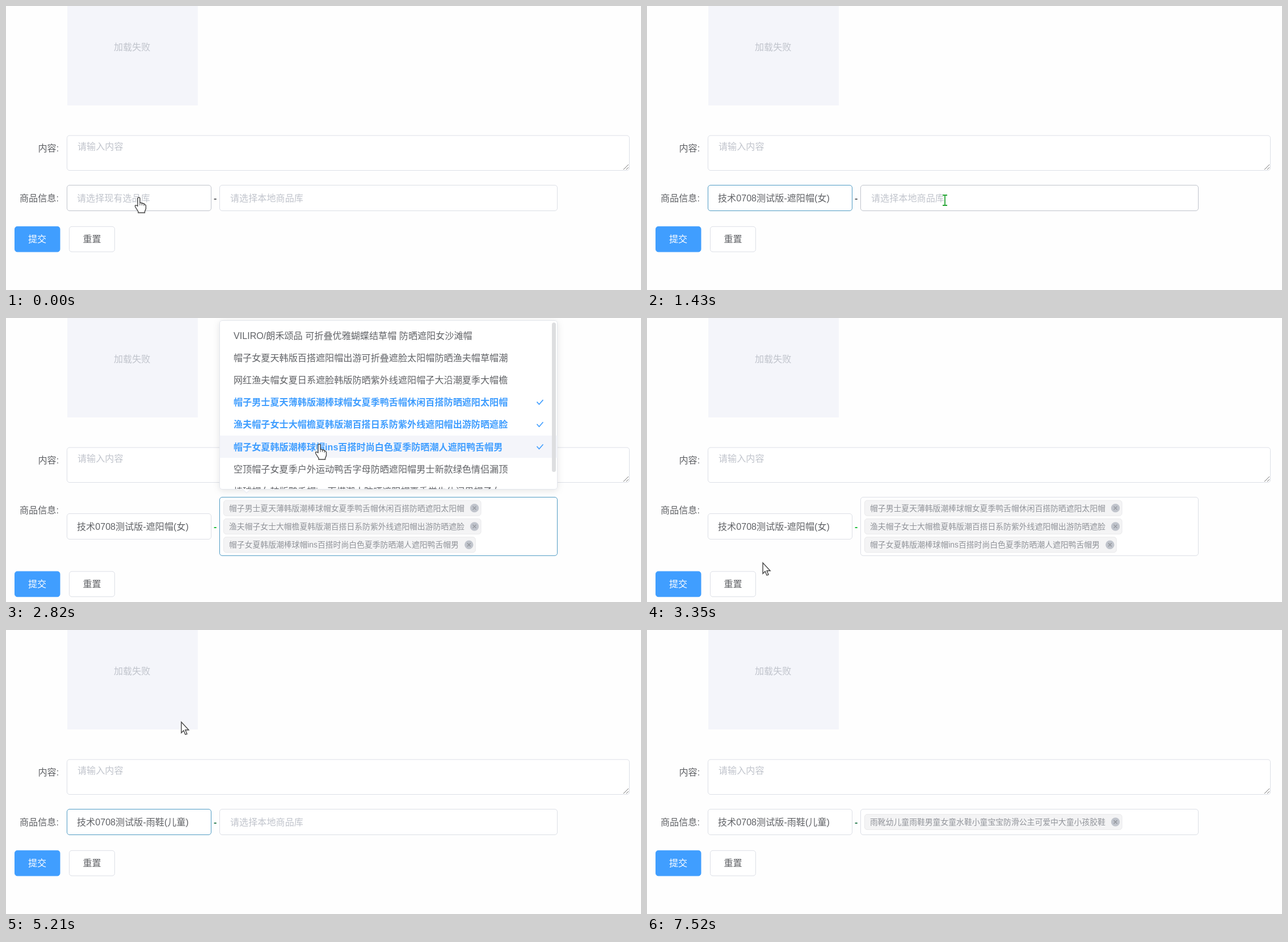
Recreate the animation shown at these times as an HTML page. Size 1119 by 500 pixels, loop 7.59 s.

```html
<!DOCTYPE html>
<html lang="zh-CN">
<head>
<meta charset="utf-8">
<style>
  html, body { margin: 0; width: 100%; height: 100%; overflow: hidden; background: #fefefe; }
  svg { display: block; }
  text { font: 16.13px "Liberation Sans", "Noto Sans CJK SC", "Noto Sans CJK", sans-serif; fill: #606266; }
  text.hint { fill: #c0c4cc; }
  text.tag { font-size: 13.83px; fill: #909399; }
  text.on { fill: #409eff; font-weight: 700; }
</style>
</head>
<body>
<svg id="stage" width="1119" height="500"></svg>
<script>
const LOOP = 7590, TICK = LOOP / 100, MOVE = 380;
const ROW = 39.2, TAG_ROW = 32.3, FIELD = 46, PAD = 7;
const LINE = '#dcdfe6', SOFT = '#f4f5fa', FOCUS = '#4f9bc4', BLUE = '#409eff';

// Pointer stops: each is reached at its time, after a move of at most MOVE ms
const stops = [
  { at: 0, x: 234, y: 337 }, { at: 600, x: 265, y: 200 },
  { at: 1400, x: 525, y: 342 }, { at: 2000, x: 557, y: 159 },
  { at: 2420, x: 554, y: 190 }, { at: 2600, x: 552, y: 222 },
  { at: 3200, x: 203, y: 433 }, { at: 3680, x: 240, y: 365 },
  { at: 4600, x: 309, y: 162 }, { at: 5650, x: 502, y: 342 },
  { at: 6200, x: 515, y: 384 }, { at: 7000, x: 700, y: 190 }
];

// When each dropdown opens and closes
const kindsA = [345, 740], hatsOpen = [1460, 3030], kindsB = [3690, 4800], bootsOpen = [5900, 7040];
const bootsPicked = 6430, pointerGone = 7360;
const hatPicked = i => 2130 + i * 265;

const kinds = ['凉鞋(男)', '雨鞋(儿童)', '雨伞(男)', '遮阳帽(女)', '泳衣(女)', '书包(儿童)']
  .map(k => '技术0708测试版-' + k);
const hats = [
  'VILIRO/朗禾颂品 可折叠优雅蝴蝶结草帽 防晒遮阳女沙滩帽',
  '帽子女夏天韩版百搭遮阳帽出游可折叠遮脸太阳帽防晒渔夫帽草帽潮',
  '网红渔夫帽女夏日系遮脸韩版防晒紫外线遮阳帽子大沿潮夏季大帽檐',
  '帽子男士夏天薄韩版潮棒球帽女夏季鸭舌帽休闲百搭防晒遮阳太阳帽',
  '渔夫帽子女士大帽檐夏韩版潮百搭日系防紫外线遮阳帽出游防晒遮脸',
  '帽子女夏韩版潮棒球帽ins百搭时尚白色夏季防晒潮人遮阳鸭舌帽男',
  '空顶帽子女夏季户外运动鸭舌字母防晒遮阳帽男士新款绿色情侣漏顶',
  '棒球帽女韩版鸭舌帽ins百搭潮人防晒遮阳帽夏季学生休闲男帽子女'
];
const boots = ['雨靴幼儿童雨鞋男童女童水鞋小童宝宝防滑公主可爱中大童小孩胶鞋'];

const clamp = u => Math.max(0, Math.min(1, u));
const ease = u => 1 - (1 - clamp(u)) ** 5;
const smooth = u => u * u * (3 - 2 * u);
const within = (t, [a, b]) => t >= a && t < b;
const shown = (t, [a, b]) => ease((t - a) / 200) * (1 - ease((t - b) / 200));

const text = (x, mid, s, cls = '', style = '') =>
  `<text x="${x}" y="${mid + 6}" class="${cls}" style="${style}">${s}</text>`;
const box = (x, y, w, h, stroke = LINE, fill = '#fff') =>
  `<rect x="${x + .5}" y="${y + .5}" width="${w - 1}" height="${h - 1}" rx="4.5" fill="${fill}" stroke="${stroke}"/>`;
const line = (d, stroke, width = 1) =>
  `<path d="${d}" fill="none" stroke="${stroke}" stroke-width="${width}"/>`;
const solid = d => `<path d="${d}" fill="#fff" stroke="#444" stroke-width="1.4"/>`;

const pointers = {
  arrow: solid('M0 0V19L4 15L7 22L10 21L7 14H13Z'),
  hand: solid('M-2 16V2a2 2 0 0 1 4 0V9l7 2l3.5 3v6l-2 5v2H-1V25l-5 -8q-2 -5 4 -2Z') +
    line('M2 9v5m3.5 -4v4m3.5 -3v4', '#444'),
  beam: line('M-4 -9H4M0 -9V9M-4 9H4', '#27a536', 1.8)
};

function pointerAt(t) {
  const i = stops.findLastIndex(s => s.at <= t);
  const from = stops[i], to = stops[i + 1];
  if (!to) return from;
  const time = Math.min(MOVE, to.at - from.at);
  const u = smooth(clamp(1 - (to.at - t) / time));
  return { x: from.x + (to.x - from.x) * u, y: from.y + (to.y - from.y) * u };
}

const over = (m, { x, y, w, h }) => m.x >= x && m.x <= x + w && m.y >= y && m.y <= y + h;

// A dropdown that unfolds from the edge facing its field
function drawMenu(menu, mouse) {
  const { x, y, w, h, up, items, picked, check, bar, p } = menu;
  const edge = up ? y + h : y, dir = up ? 1 : -1;
  const row = over(mouse, menu) ? Math.floor((mouse.y - y - PAD) / ROW) : -1;
  const list = items.map((s, i) => {
    const top = PAD + i * ROW, on = picked.includes(s);
    return (i === row ? `<rect y="${top}" width="${w}" height="${ROW}" fill="${SOFT}"/>` : '') +
      text(24.5, top + ROW / 2, s, on ? 'on' : '') +
      (on && check ? line(`M${w - 37} ${top + 19}l4 4.5l7 -8`, BLUE, 1.6) : '');
  }).join('');
  return `<g opacity="${p}" transform="translate(0 ${edge}) scale(1 ${p}) translate(0 ${-edge})">
    <g style="filter:drop-shadow(0 2px 6px rgba(0,0,0,.1))">${box(x, y, w, h, '#e4e7ed')}</g>
    <svg x="${x + .5}" y="${y}" width="${w - 1}" height="${h - 1}">${list}</svg>
    ${solid(`M${x + 41} ${edge - dir}l7 ${PAD * dir}l7 ${-PAD * dir}`).replace('#444', '#ebeef5')}
    ${bar ? `<rect x="${x + w - 10}" y="${y + 4}" width="7" height="263" rx="3.5" fill="#dddee0"/>` : ''}
  </g>`;
}

function drawTag(s, mid) {
  const w = [...s].reduce((n, c) => n + (c > '~' ? 13.85 : 6), 39), cx = 371 + w;
  return box(383, mid - 14, w, 28, '#e9e9eb', '#f4f4f5') + text(393, mid - .8, s, 'tag') +
    `<circle cx="${cx}" cy="${mid}" r="7.7" fill="#c0c4cc"/>` +
    line(`M${cx - 3} ${mid - 3}l6 6m0 -6l-6 6`, '#909399', 1.2);
}

function draw(t) {
  const second = t >= kindsB[1];
  const value = second ? kinds[1] : t >= kindsA[1] ? kinds[3] : '';
  const tags = second
    ? boots.filter(() => t >= bootsPicked)
    : hats.slice(3, 6).filter((s, i) => t >= hatPicked(i));
  const high = Math.max(FIELD, tags.length * TAG_ROW + PAD);
  const mid = 315 + high / 2, buttons = 341.8 + high;
  const mouse = pointerAt(t);

  const field1 = { x: 107, y: mid - FIELD / 2, w: 255, h: FIELD };
  const field2 = { x: 376, y: 315, w: 596, h: high };
  const area = { x: 107, y: 227.5, w: 992, h: 62.5 };

  const left = { ...field1, y: field1.y - 262, h: 249, up: true, items: kinds, picked: [value] };
  const right = { ...field2, picked: tags, check: true };
  const menus = [
    { ...left, span: kindsA },
    { ...left, span: kindsB },
    { ...right, span: hatsOpen, y: 4, h: 298, up: true, items: hats, bar: true },
    { ...right, span: bootsOpen, y: 375, h: 54, items: boots }
  ].map(m => ({ ...m, p: shown(t, m.span) })).filter(m => m.p > .01);

  const inMenu = menus.some(m => within(t, m.span) && over(mouse, m));
  const hover = b => !inMenu && over(mouse, b);
  const focus1 = within(t, [kindsA[0], hatsOpen[0]]) || within(t, [kindsB[0], bootsOpen[0]]);
  const focus2 = within(t, hatsOpen) || within(t, bootsOpen);
  const input = (b, focus) =>
    box(b.x, b.y, b.w, b.h, focus ? FOCUS : hover(b) ? '#c0c4cc' : LINE);
  const shape = inMenu || hover(field1) ? 'hand' : hover(field2) || hover(area) ? 'beam' : 'arrow';
  const dash = second ? '#2f7f55' : tags.length > 2 ? '#1fbf3a' : '#606266';

  stage.innerHTML =
    `<rect x="108" width="230" height="175" fill="${SOFT}"/>` +
    text(190, 72, '加载失败', 'hint') +
    text(56.5, 250, '内容:') +
    input(area) +
    text(126, 247, '请输入内容', 'hint') +
    line('M1088 288l9 -9m-4 9l4 -4', '#777') +
    text(24, 338, '商品信息:') +
    input(field1, focus1) +
    text(125, mid, value || '请选择现有选品库', value ? '' : 'hint') +
    text(366, mid, '-', '', `fill:${dash};font-weight:700`) +
    input(field2, focus2) +
    (tags.map((s, i) => drawTag(s, mid + (i - (tags.length - 1) / 2) * TAG_ROW)).join('') ||
      text(395, 338, '请选择本地商品库', 'hint')) +
    box(15, buttons, 80.5, 45.5, BLUE, BLUE) +
    text(39, buttons + 22.2, '提交', '', 'fill:#fff') +
    box(111, buttons, 81, 45.5) +
    text(135.5, buttons + 22.2, '重置') +
    menus.map(m => drawMenu(m, mouse)).join('') +
    (t < pointerGone ? `<g transform="translate(${mouse.x} ${mouse.y})">${pointers[shape]}</g>` : '');
}

const stage = document.getElementById('stage');
let begin, drawn = -1;
function frame(now) {
  begin ??= now;
  // The picture refreshes in even ticks
  const tick = Math.floor(((now - begin) % LOOP + 15) / TICK) % 100;
  if (tick !== drawn) draw((drawn = tick) * TICK);
  requestAnimationFrame(frame);
}
draw(0);
requestAnimationFrame(frame);
</script>
</body>
</html>
```
